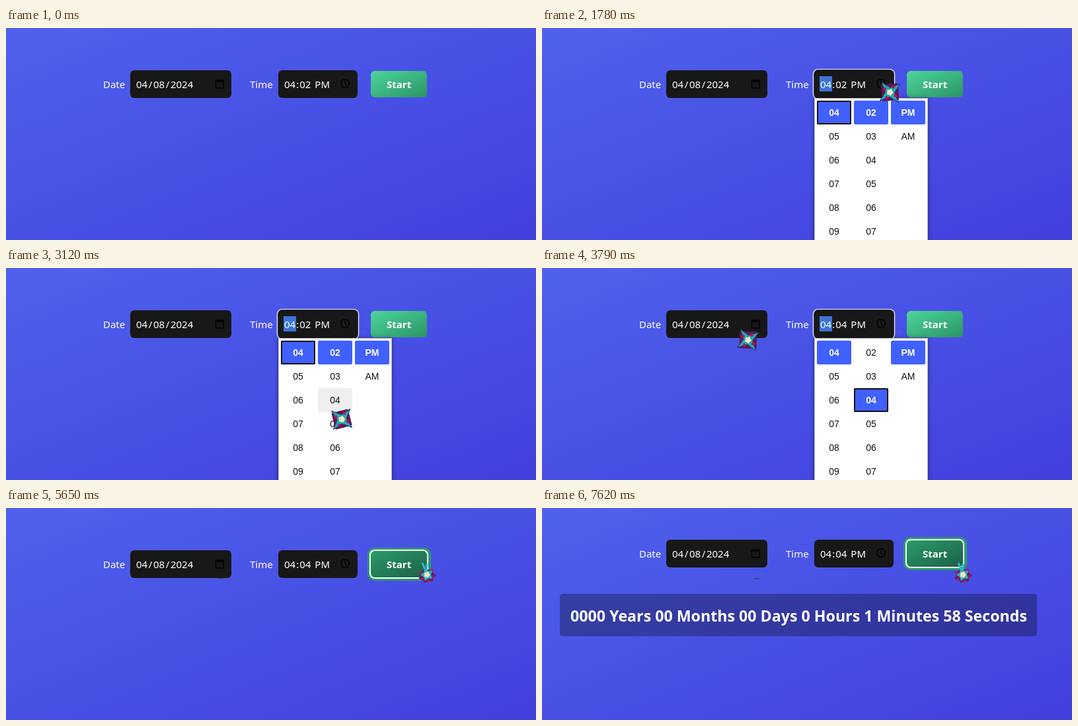
Recreate the animation shown at these times as an HTML page. Size 802 by 321 pixels, loop 8 s.

```html
<!DOCTYPE html>
<html lang="en">
<head>
<meta charset="utf-8">
<title>Countdown</title>
<style>
html, body { margin: 0; width: 100%; height: 100%; overflow: hidden; }
body { background: linear-gradient(to bottom right, #4e62ed, #433fdd); }
svg { display: block; width: 802px; height: 321px; }
text { font: 15px "Noto Sans", "Open Sans", sans-serif; fill: #fff; white-space: pre; }
.bold { font-weight: 700; }
.field { fill: #181818; }
.icon { fill: none; stroke: #000; stroke-width: 1.5; }
#popup text { font: 14px "Liberation Sans", Arial, sans-serif; fill: #111; text-anchor: middle; }
#popup .on text { font-weight: 700; fill: #fff; }
.cell { fill: #fff; }
.hover .cell { fill: #efefef; }
.on .cell { fill: #4060ff; }
.edge { fill: none; }
.focus .edge { stroke: #101010; stroke-width: 2; }
#sheet { filter: drop-shadow(0 1px 3px rgba(0, 0, 0, .5)); }
#result text { font-size: 23.2px; }
</style>
</head>
<body>
<svg viewBox="0 0 802 321">
  <defs>
    <linearGradient id="bright" x2="1" y2="1">
      <stop stop-color="#4dd69c"/><stop offset="1" stop-color="#2a9465"/>
    </linearGradient>
    <linearGradient id="deep" x2="1" y2="1">
      <stop stop-color="#2a9c68"/><stop offset="1" stop-color="#1c5f49"/>
    </linearGradient>
  </defs>

  <g id="form">
    <text x="147" y="91">Date</text>
    <rect class="field" x="188" y="64" width="153" height="42" rx="6"/>
    <text x="197" y="91" dx="0 0 1.6 1.6 0 1.6 1.6">04/08/2024</text>
    <g class="icon">
      <rect x="317.5" y="79.5" width="11.5" height="11.5" rx="1"/>
      <path d="M317 81h12.5M320 77.5v2M326.5 77.5v2"/>
    </g>

    <text x="369" y="91">Time</text>
    <rect class="field" x="412" y="64" width="120" height="42" rx="6"/>
    <g id="timeFocus">
      <rect class="field" x="410.5" y="62.5" width="123" height="45" rx="7" stroke="#fff" stroke-width="1.2"/>
      <rect x="420" y="73" width="19" height="23" fill="#3b74d9"/>
    </g>
    <text id="time" x="421" y="91" dx="0 0 1 1 0 1 1"></text>
    <g class="icon">
      <circle cx="513" cy="84" r="6.3"/>
      <path d="M513 80v4.300l3 2"/>
    </g>

    <g id="ring">
      <rect x="547" y="60" width="96" height="50" rx="10" fill="#2a9c68"/>
      <rect x="550" y="63" width="89" height="44" rx="8" fill="#fff"/>
    </g>
    <rect id="button" x="552" y="65" width="85" height="40" rx="6"/>
    <text class="bold" x="576" y="91">Start</text>
  </g>

  <rect id="trace" x="320" y="106" width="11" height="1.5" fill="#44466e"/>

  <g id="result">
    <rect x="27" y="130" width="722" height="64" rx="4" fill="#000" fill-opacity=".3"/>
    <text id="count" class="bold" x="43" y="172"></text>
  </g>

  <g id="popup">
    <rect id="sheet" x="412.5" y="106.5" width="171" height="230" fill="#fff" stroke="#b8b8c4"/>
  </g>

  <g id="cursor"><g id="star"></g><g id="hand"></g></g>
</svg>

<script>
const LOOP = 8000;
const APPEAR = 130, FOCUS = 720, OPEN = 1650, PICK = 3320, CLOSE = 4720;
const HOVER = 5180, PRESS = 5520, RESULT = 6650, TICK = 7620;

const entry = { x: 535, y: 241 };
const moves = [
  { from: APPEAR, to: FOCUS, x: 489, y: 82 },
  { from: 1010, to: 1340, x: 512, y: 79, bow: 15 },
  { from: OPEN, to: 2210, x: 502, y: 89 },
  { from: 2370, to: 2910, x: 492, y: 222, bow: -34 },
  { from: 3090, to: 3150, x: 492, y: 203 },
  { from: PICK, to: 3850, x: 289, y: 88 },
  { from: 3850, to: 4120, x: 347, y: 99 },
  { from: 4150, to: 4540, x: 465, y: 2 },
  { from: 4990, to: 5270, x: 620, y: 81 }
];

const $ = id => document.getElementById(id);
const show = (id, on) => $(id).style.display = on ? "" : "none";
const clamp = k => Math.min(1, Math.max(0, k));
const ease = k => k * k * (3 - 2 * k);
const pad = n => String(n).padStart(2, "0");

function svg(tag, attrs, parent) {
  const node = document.createElementNS("http://www.w3.org/2000/svg", tag);
  for (const key in attrs) node.setAttribute(key, attrs[key]);
  return parent.appendChild(node);
}

function polar(cx, cy, radius, turn) {
  const angle = turn * 2 * Math.PI;
  return [cx + radius * Math.cos(angle), cy + radius * Math.sin(angle)];
}

function spikes(parent, fill, [cx, cy], count, outer, inner, turn = 0) {
  const points = Array.from({ length: count * 2 }, (_, i) =>
    polar(cx, cy, i % 2 ? inner : outer, turn + i / count / 2));
  return svg("polygon", { points: points.join(" "), fill, "stroke-linejoin": "round" }, parent);
}

function spots(parent, [cx, cy], count, distance, radius) {
  for (let i = 0; i < count; i++) {
    const [x, y] = polar(cx, cy, distance, (i + 0.3) / count);
    svg("circle", { cx: x, cy: y, r: radius, fill: "#b01858" }, parent);
  }
}

function buildCursor() {
  const middle = [16, 17], palm = [17, 20];
  spikes($("star"), "#641650", middle, 4, 18, 13, 0.1);
  spikes($("star"), "#22a9b5", middle, 4, 20, 7, 0.125).setAttribute("stroke", "#25346e");
  spots($("star"), middle, 4, 9.5, 2.4);
  spikes($("star"), "#f3e6c0", middle, 5, 5.5, 4);

  spikes($("hand"), "#60205e", palm, 7, 14, 10).setAttribute("transform", "translate(0 4) scale(1 .85)");
  spots($("hand"), palm, 6, 10, 2.2);
  svg("path", { d: "M10 2l6 15 1-14", fill: "none", stroke: "#2bbcc8", "stroke-width": 3 }, $("hand"));
  spikes($("hand"), "#25b4c0", palm, 5, 10, 6, 0.1);
  spikes($("hand"), "#f3e6c0", palm, 5, 5, 4);
}

function buildCells() {
  const sixFrom = start => Array.from({ length: 6 }, (_, i) => pad(start + i));
  return [sixFrom(4), sixFrom(2), ["PM", "AM"]].flatMap((labels, col) =>
    labels.map((label, row) => {
      const x = 416 + col * 56, y = 110 + row * 36;
      const node = svg("g", {}, $("popup"));
      svg("rect", { class: "cell", x, y, width: 52, height: 36, rx: 2 }, node);
      svg("rect", { class: "edge", x: x + 1, y: y + 1, width: 50, height: 34, rx: 1 }, node);
      svg("text", { x: x + 26, y: y + 23 }, node).textContent = label;
      return { node, col, row, x, y };
    }));
}

function cursorAt(t) {
  let { x, y } = entry;
  for (const move of moves) {
    const k = ease(clamp((t - move.from) / (move.to - move.from)));
    x += (move.x - x) * k + (move.bow || 0) * Math.sin(Math.PI * k);
    y += (move.y - y) * k;
  }
  return { x, y };
}

function drawPopup(t, px, py) {
  const picked = t >= PICK;
  for (const { node, col, row, x, y } of cells) {
    const on = row === (picked && col === 1 ? 2 : 0);
    const focus = on && col === (picked ? 1 : 0);
    const hover = px >= x && px < x + 52 && py >= y && py < y + 36;
    node.setAttribute("class", [on && "on", focus && "focus", hover && "hover"].filter(Boolean).join(" "));
  }
}

function draw(t) {
  const { x, y } = cursorAt(t);
  const open = t >= OPEN && t < CLOSE;
  show("popup", open);
  if (open) drawPopup(t, x + 1, y + 1);

  const pointing = t >= HOVER;
  const tilt = pointing ? 0 : 12 * Math.sin(x / 20);
  show("cursor", t >= APPEAR);
  show("star", !pointing);
  show("hand", pointing);
  $("cursor").setAttribute("transform", `translate(${x} ${y}) rotate(${tilt} 16 16)`);

  $("form").setAttribute("transform", `translate(0 ${t < RESULT ? 0 : -16})`);
  $("time").textContent = t < PICK ? "04:02 PM" : "04:04 PM";
  show("timeFocus", t >= FOCUS && t < CLOSE);
  $("button").setAttribute("fill", pointing ? "url(#deep)" : "url(#bright)");
  show("ring", t >= PRESS);

  show("trace", t >= 4150);
  show("result", t >= RESULT);
  $("count").textContent = `0000 Years 00 Months 00 Days 0 Hours 1 Minutes ${t < TICK ? 59 : 58} Seconds`;
}

buildCursor();
const cells = buildCells();
const start = performance.now();
function frame() {
  draw((performance.now() - start) % LOOP);
  requestAnimationFrame(frame);
}
frame();
</script>
</body>
</html>
```
